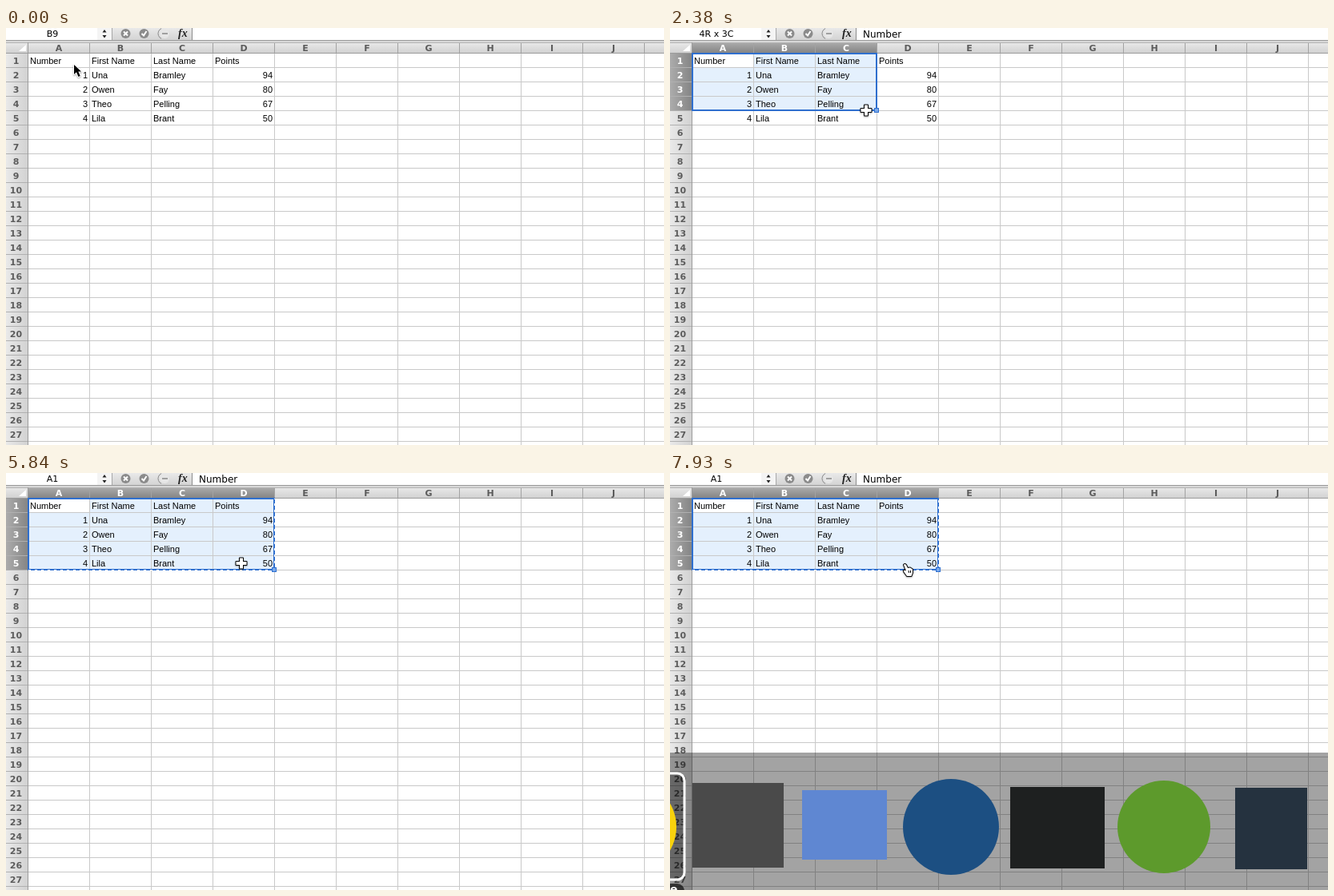
An HTML page with a canvas for the animation above (8 s loop, 822 by 522 pixels).

```html
<!DOCTYPE html>
<html lang="en">
<head>
<meta charset="utf-8">
<title>Spreadsheet copy</title>
<style>
html, body { margin: 0; width: 100%; height: 100%; overflow: hidden; background: #fff; }
canvas { display: block; }
</style>
</head>
<body>
<canvas id="stage" width="822" height="522"></canvas>
<script>
const g = document.getElementById('stage').getContext('2d');
const W = 822, H = 522, LOOP = 8000;
const LEFT = 27, TOP = 31, CW = 77, RH = 18;
const CELL = '11px "Liberation Sans", Arial, sans-serif';
const UI = '11px "DejaVu Sans", sans-serif';
const HEAD = 'bold ' + UI;
const BLUE = '#2f6fce';

const rows = [
  ['Number', 'First Name', 'Last Name', 'Points'],
  [1, 'Una', 'Bramley', 94],
  [2, 'Owen', 'Fay', 80],
  [3, 'Theo', 'Pelling', 67],
  [4, 'Lila', 'Brant', 50]
];

// time, cursor shape, x, y
const cursorKeys = [
  [0, arrow, 84, 45], [140, arrow, 82, 46], [740, cross, 86, 54], [890, cross, 88, 55],
  [1190, cross, 78, 45], [1340, cross, 68, 45], [1780, cross, 72, 46], [1930, cross, 98, 55],
  [2080, cross, 140, 65], [2230, cross, 195, 84], [2380, cross, 245, 103],
  [2530, cross, 290, 112], [2680, cross, 294, 113], [3730, hand, 291, 113],
  [4180, cross, 294, 113], [5990, hand, 291, 113]
];

// time, first column, first row, columns, rows
const selectionKeys = [
  [0, 1, 8, 0, 0], [590, 1, 8, 1, 1], [1630, 0, 0, 1, 1], [1930, 0, 0, 1, 2],
  [2080, 0, 0, 2, 2], [2230, 0, 0, 3, 3], [2380, 0, 0, 3, 4], [2530, 0, 0, 4, 5]
];

const at = (keys, t) => keys.filter(k => k[0] <= t).pop();

function box(x, y, w, h, fill) {
  g.fillStyle = fill;
  g.fillRect(x, y, w, h);
}

function disc(x, y, r, fill) {
  g.fillStyle = fill;
  g.beginPath();
  g.arc(x, y, r, 0, 7);
  g.fill();
}

function text(s, x, y, font, fill = '#000', align = 'left') {
  g.font = font;
  g.fillStyle = fill;
  g.textAlign = align;
  g.fillText(s, x, y);
}

function shade(x0, y0, x1, y1, from, to) {
  const s = g.createLinearGradient(x0, y0, x1, y1);
  s.addColorStop(0, from);
  s.addColorStop(1, to);
  return s;
}

function line(points, color, width = 1, dash = [], offset = 0) {
  g.strokeStyle = color;
  g.lineWidth = width;
  g.setLineDash(dash);
  g.lineDashOffset = offset;
  g.beginPath();
  points.forEach(p => g.lineTo(...p));
  g.stroke();
  g.setLineDash([]);
}

function shape(path, x, y, fill, stroke, width) {
  g.save();
  g.translate(x, y);
  g.shadowColor = 'rgba(0,0,0,.35)';
  g.shadowBlur = 2;
  g.shadowOffsetY = 1;
  const p = new Path2D(path);
  g.lineJoin = 'round';
  g.strokeStyle = stroke;
  g.lineWidth = width;
  g.stroke(p);
  g.shadowColor = 'transparent';
  g.fillStyle = fill;
  g.fill(p);
  g.restore();
}

function arrow(x, y) {
  shape('M1 1V13L4 10.3L6.4 16L8.7 15L6.3 9.5H10Z', x, y, '#000', '#fff', 2);
}

function cross(x, y) {
  shape('M-2-6.5H2V-2H6.5V2H2V6.5H-2V2H-6.5V-2H-2Z', x, y, '#fff', '#000', 2);
}

function hand(x, y) {
  shape('M1 2Q2 0 4 2L6 6L9 5.5L12 7.5L12 12L10.5 16H5L1 10.5Q0 8 3 9L4 9.5Z', x, y, '#fff', '#000', 2);
  line([[x + 7, y + 9], [x + 7.5, y + 12]], '#000');
  line([[x + 9.5, y + 9], [x + 9.5, y + 12]], '#000');
}

function toolbar(name, formula) {
  box(0, 0, W, 16, '#fff');
  box(114, 0, 18, 16, '#f4f4f4');
  box(132, 0, 101, 16, shade(0, 0, 0, 16, '#e9e9e9', '#d2d2d2'));
  box(132, 0, 1, 16, '#a8a8a8');
  box(232, 0, 1, 16, '#8c8c8c');
  box(0, 15, W, 1, '#9a9a9a');
  box(0, 16, W, 2, '#d8d8d8');
  text(name, 58, 11, UI, '#000', 'center');
  text(formula, 241, 12, '12px "DejaVu Sans", sans-serif');

  g.fillStyle = '#222';
  g.fill(new Path2D('M120.5 5.5L123 2L125.5 5.5ZM120.5 9L123 12.5L125.5 9Z'));
  disc(149.5, 7, 6, '#8b8b8b');
  disc(172.5, 7, 6, '#8b8b8b');
  line([[147, 4.5], [152, 9.5]], '#fff', 2);
  line([[152, 4.5], [147, 9.5]], '#fff', 2);
  line([[169.5, 7], [172, 9.5], [175.5, 4]], '#fff', 2);
  disc(198, 7, 6, '#e6e6e6');
  g.strokeStyle = '#8b8b8b';
  g.lineWidth = 1;
  g.beginPath();
  g.arc(197, 7, 7, 2, 4.3);
  g.stroke();
  box(195, 6, 7, 2, '#a0a0a0');
  text('fx', 215, 11, 'italic bold 14px "Liberation Serif", serif', '#222');
}

function header(label, x, y, w, h, on, vertical) {
  const [from, to] = on ? ['#acacac', '#858585'] : ['#e9e9e9', '#d2d2d2'];
  box(x, y, w, h, vertical ? shade(x, 0, x + w, 0, from, to) : shade(0, y, 0, y + h, from, to));
  text(label, x + w / 2 - (vertical ? 1 : 0), y + h / 2 + 4, HEAD, on ? '#fff' : '#5c5c5c', 'center');
}

function sheet([, c0, r0, nc, nr], copied, t) {
  const X = c => LEFT + c * CW, Y = r => TOP + r * RH;
  box(0, 18, W, H, '#fff');
  if (nc * nr > 1) {
    box(X(c0), Y(r0), nc * CW, nr * RH, '#e4f0fd');
    box(X(c0), Y(r0), CW, RH, '#fff');
  }
  for (let c = 0; c <= 10; c++) box(X(c), TOP, 1, H, '#c9c9c9');
  for (let r = 0; r <= 27; r++) box(LEFT, Y(r), W, 1, '#c9c9c9');

  for (let c = 0; c < 11; c++) {
    header('ABCDEFGHIJ'[c] || '', X(c) + 1, 18, CW - 1, 13, nc && c >= c0 && c < c0 + nc, false);
    box(X(c), 18, 1, 13, '#a2a2a2');
  }
  for (let r = 0; r < 28; r++) {
    header(r + 1, 0, Y(r) + 1, LEFT, RH - 1, nr && r >= r0 && r < r0 + nr, true);
    box(0, Y(r), LEFT, 1, '#b0b0b0');
  }
  box(0, 18, LEFT, 13, shade(0, 18, 0, 31, '#e9e9e9', '#d2d2d2'));
  g.fillStyle = '#fff';
  g.fill(new Path2D('M25 21V29H16Z'));
  box(0, 18, W, 1, '#b4b4b4');
  box(0, TOP, W, 1, '#9c9c9c');
  box(LEFT, 18, 1, H, '#9c9c9c');

  rows.forEach((row, r) => row.forEach((v, c) => {
    const num = typeof v === 'number';
    text(v, num ? X(c + 1) - 2 : X(c) + 3, Y(r) + 14, CELL, '#000', num ? 'right' : 'left');
  }));

  if (!nc) return;
  const x = X(c0) + 1, y = Y(r0) + 1, x2 = X(c0 + nc), y2 = Y(r0 + nr);
  line([[x, y2], [x, y], [x2, y], [x2, y2], [x, y2], [x, y]], BLUE, 2);
  if (copied) {
    const step = Math.floor((t - 4180) / 150);
    line([[x, y2 + .5], [x2, y2 + .5]], '#fff', 1, [3, 5]);
    line([[x2 + .5, y], [x2 + .5, y2]], '#fff', 1, [3, 5], -2 * step);
  }
  box(x2 - 3, y2 - 3, 6, 6, BLUE);
  box(x2 - 2, y2 - 2, 4, 4, '#79a9ec');
}

function switcher(picked) {
  box(0, 350, W, H, 'rgba(0,0,0,.36)');
  if (picked) {
    g.beginPath();
    g.roundRect(-116, 376, 134, 133, 9);
    g.fillStyle = 'rgba(0,0,0,.3)';
    g.fill();
    g.strokeStyle = '#fff';
    g.lineWidth = 3;
    g.stroke();
    g.beginPath();
    g.roundRect(-100, 514, 118, 30, 9);
    g.fillStyle = 'rgba(0,0,0,.65)';
    g.fill();
    text('e', 0, 526, 'bold 14px "DejaVu Sans", sans-serif', '#fff');
  }
  disc(-50, 443, 58, '#f8d20c');
  box(28, 388, 114, 106, '#4a4a4a');
  box(165, 397, 106, 87, '#5f87d2');
  disc(351, 443, 60, '#1c4f82');
  box(425, 393, 118, 102, '#1e2020');
  disc(617, 443, 58, '#5d9a2c');
  box(706, 394, 90, 102, '#25323f');
}

function draw(now) {
  const t = now % LOOP;
  const sel = at(selectionKeys, t);
  const [, , , nc, nr] = sel;
  const dragging = t >= 1930 && t < 2980;
  const name = t < 1630 ? 'B9' : dragging ? `${nr}R x ${nc}C` : 'A1';
  sheet(sel, t >= 4180, t);
  toolbar(name, t < 1630 ? '' : 'Number');
  if (t >= 5990) switcher(t >= 7040);
  const [, cursor, x, y] = at(cursorKeys, t);
  cursor(x, y);
}

const start = performance.now();
function tick() {
  draw(performance.now() - start);
  requestAnimationFrame(tick);
}
tick();
</script>
</body>
</html>
```
